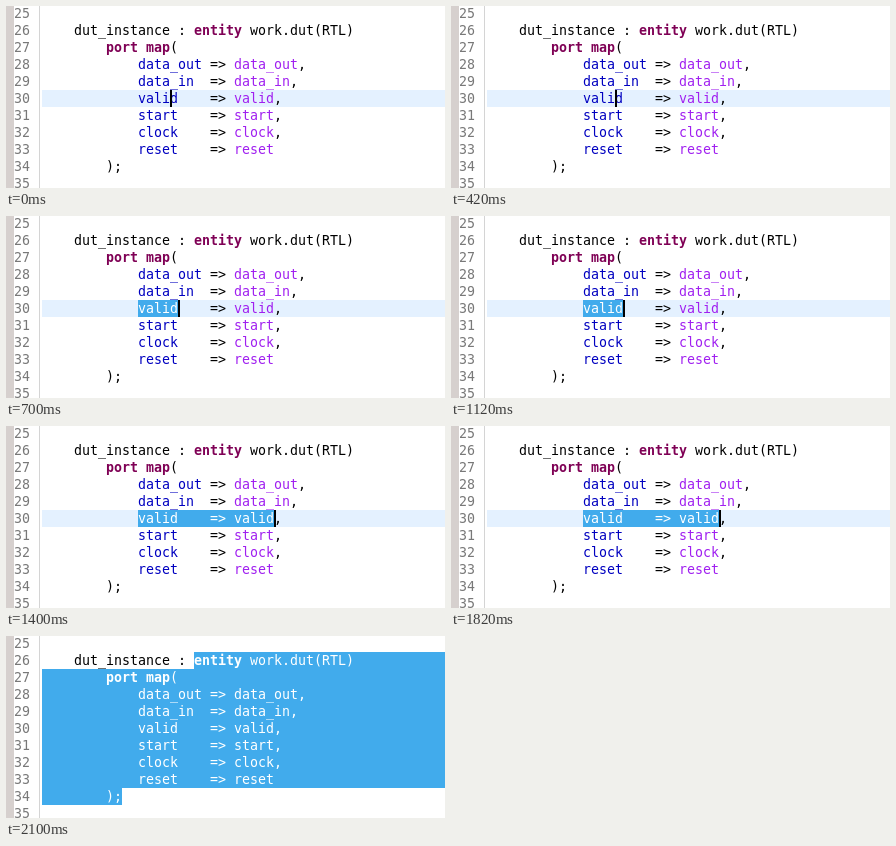
Recreate the animation shown at these times as an HTML page. Size 439x182 px, loop 2.8 s.

```html
<!DOCTYPE html>
<html lang="en">
<head>
<meta charset="utf-8">
<title>Expanding selection</title>
<style>
  html, body { margin: 0; width: 100%; height: 100%; overflow: hidden; background: #fff; }
  #stage {
    position: relative; width: 439px; height: 182px; overflow: hidden;
    font: 13.29px/17px "DejaVu Sans Mono", monospace; color: #000;
  }
  #stage div { position: absolute; }
  .strip { left: 0; top: 0; width: 8px; height: 182px; background: #d6d0ce; }
  .rule { left: 33px; top: 0; width: 1px; height: 182px; background: #d4d4d4; }
  .row { white-space: pre; height: 17px; }
  .num { left: 8px; color: #787878; }
  .layer { left: 0; top: 0; width: 439px; height: 182px; }
  .kw { color: #7f0055; font-weight: bold; }
  .port { color: #0000c0; }
  .sig { color: #a020f0; }
  #current { left: 36px; top: 84px; width: 403px; height: 17px; background: #e4f1ff; }
  #selected { background: #41abec; color: #fff; }
  #selected span { color: #fff; }
  #caret { left: 0; top: 84px; width: 2px; height: 17px; background: #000; }
</style>
</head>
<body>
<div id="stage">
  <div class="strip"></div>
  <div class="rule"></div>
  <div id="current"></div>
  <div id="code" class="layer"></div>
  <div id="selected" class="layer"></div>
  <div id="caret"></div>
</div>
<script>
const FIRST = 25, LAST = 35, CELL = 8, ROW = 17, LEFT = 36, WIDTH = 439;
const $ = id => document.getElementById(id);
const colX = col => LEFT + col * CELL;
const rowY = line => (line - FIRST) * ROW - 1;

function addText(parent, line, x, html, cls = '') {
  const el = document.createElement('div');
  el.className = 'row ' + cls;
  el.style.top = rowY(line) + 'px';
  if (x !== null) el.style.left = x + 'px';
  el.innerHTML = html;
  parent.append(el);
}

// Each token: line, column, text, style
const tokens = [
  [26, 4, 'dut_instance :'], [26, 19, 'entity', 'kw'], [26, 26, 'work.dut(RTL)'],
  [27, 8, 'port map', 'kw'], [27, 16, '('], [34, 8, ');']
];
const ports = ['data_out', 'data_in', 'valid', 'start', 'clock', 'reset'];
ports.forEach((name, i) => {
  const line = 28 + i;
  tokens.push([line, 12, name, 'port'], [line, 21, '=&gt;'], [line, 24, name, 'sig']);
  if (i < ports.length - 1) tokens.push([line, 24 + name.length, ',']);
});

for (let line = FIRST; line <= LAST; line++) addText($('stage'), line, null, line, 'num');
for (const layer of [$('code'), $('selected')])
  for (const [line, col, text, cls = ''] of tokens)
    addText(layer, line, colX(col), `<span class="${cls}">${text}</span>`);

// Outline of a selection running from one text position to another
function region(l1, c1, l2, c2) {
  const a = colX(c1), b = colX(c2), top = rowY(l1), end = rowY(l2) + ROW;
  const pts = l1 === l2
    ? [[a, top], [b, top], [b, end], [a, end]]
    : [[a, top], [WIDTH, top], [WIDTH, end - ROW], [b, end - ROW],
       [b, end], [LEFT, end], [LEFT, top + ROW], [a, top + ROW]];
  return `polygon(${pts.map(p => p.map(v => v + 'px').join(' ')).join(',')})`;
}

const steps = [
  { clip: region(30, 16, 30, 16), caret: 16, shown: 1 },
  { clip: region(30, 12, 30, 17), caret: 17, shown: 1 },
  { clip: region(30, 12, 30, 29), caret: 29, shown: 1 },
  { clip: region(26, 19, 34, 10), caret: 29, shown: 0 }
];

function play(el, pose) {
  const frames = [...steps, steps[steps.length - 1]].map((s, i) => ({
    ...pose(s), offset: i / steps.length, easing: 'steps(1, end)'
  }));
  el.animate(frames, { duration: 2800, iterations: Infinity });
}

play($('selected'), s => ({ clipPath: s.clip }));
play($('caret'), s => ({ transform: `translateX(${colX(s.caret)}px)`, opacity: s.shown }));
play($('current'), s => ({ opacity: s.shown }));
</script>
</body>
</html>
```
